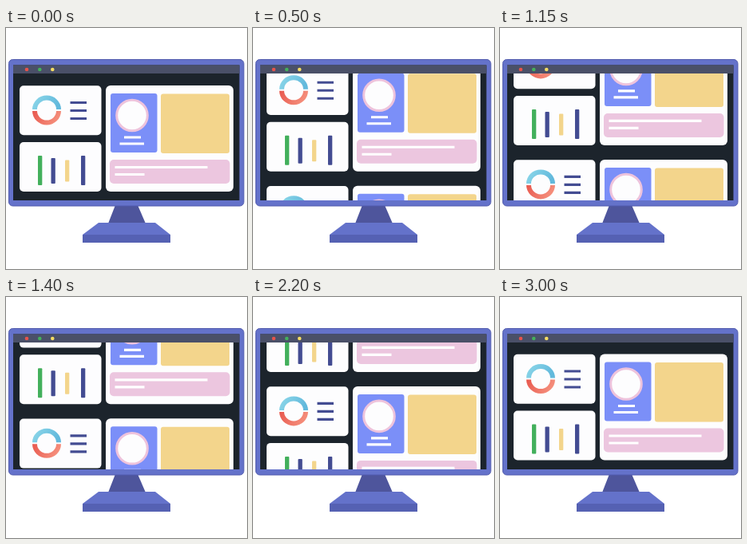
These frames come from a looping animation (302x302 px, 3050 ms). An HTML page:

```html
<!DOCTYPE html>
<html lang="en">
<head>
<meta charset="utf-8">
<title>Scrolling dashboard</title>
<style>
  html, body { margin: 0; width: 100%; height: 100%; overflow: hidden; background: #fff; }
  svg { display: block; width: 100vw; height: 100vh; }
  .navy { stroke: #434c92; }
  .white { stroke: #fff; }
  .line { fill: none; stroke-width: 3.2; }
</style>
</head>
<body>
<svg viewBox="0 0 302 302">
  <defs>
    <clipPath id="view"><rect x="10" y="57" width="282" height="159"/></clipPath>
    <linearGradient id="cool" x1="0" x2="1" y1="0" y2="0.3">
      <stop offset="0" stop-color="#8fd9ea"/><stop offset="1" stop-color="#62b9dc"/>
    </linearGradient>
    <linearGradient id="warm" x1="0" x2="1" y1="0" y2="0.3">
      <stop offset="0" stop-color="#e8584e"/><stop offset="1" stop-color="#f58f7c"/>
    </linearGradient>
    <g id="page">
      <g fill="#fdfdfe">
        <rect x="17" y="72.3" width="102.5" height="62" rx="5"/>
        <rect x="17" y="143" width="102.5" height="62" rx="5"/>
        <rect x="125" y="72" width="160" height="133" rx="6"/>
      </g>
      <!-- ring chart and list -->
      <path d="M33 102a18 17.5 0 0 1 36 0h-6a12 11.5 0 0 0-24 0z" fill="url(#cool)"/>
      <path d="M33 104a18 17.5 0 0 0 36 0h-6a12 11.5 0 0 1-24 0z" fill="url(#warm)"/>
      <path class="line navy" d="M80.5 93.5h20.5M80.5 103.5h20.5M80.5 113.5h20.5"/>
      <!-- bars -->
      <rect x="40" y="160" width="5.3" height="37" rx="1" fill="#43b05c"/>
      <rect x="56.5" y="163" width="5.3" height="32" rx="1" fill="#434c92"/>
      <rect x="74" y="165.5" width="5.3" height="27" rx="1" fill="#f3d58c"/>
      <rect x="94" y="160" width="5.3" height="37" rx="1" fill="#434c92"/>
      <!-- profile, panel and text strip -->
      <rect x="131" y="82" width="58.5" height="74" rx="3" fill="#7b8ff8"/>
      <circle cx="158" cy="109.5" r="19.3" fill="#fdfdfe" stroke="#eec3dc" stroke-width="3"/>
      <path class="line white" d="M148 137h21M142.5 145h30.5"/>
      <rect x="194" y="82.5" width="86" height="74.5" rx="3" fill="#f3d58c"/>
      <rect x="130" y="165" width="150.5" height="30" rx="5" fill="#ecc6df"/>
      <path class="line white" d="M136.5 174.5h116M136.5 183.5h37"/>
    </g>
  </defs>

  <path d="M137 222h28l10 23H128z" fill="#4e559c"/>
  <path d="M116 244h71l19 15H96z" fill="#6472ca"/>
  <path d="M96 259h110v10H96z" fill="#5561b3"/>

  <rect x="3.5" y="39.5" width="294.5" height="183.5" rx="5" fill="#6472ca" stroke="#515bad"/>
  <rect x="9" y="46.5" width="283.5" height="169.5" fill="#1c242c"/>
  <g clip-path="url(#view)">
    <g id="scroll">
      <use href="#page"/>
      <use href="#page" y="151"/>
    </g>
  </g>
  <rect x="9" y="46.5" width="283.5" height="10.5" fill="#4a5068"/>
  <circle cx="26" cy="52" r="2.3" fill="#e5534d"/>
  <circle cx="42.3" cy="52" r="2.3" fill="#43b05c"/>
  <circle cx="58.3" cy="52" r="2.3" fill="#f5dc62"/>
</svg>
<script>
  const LOOP = 3050, STEP = 50, SPEED = 0.0505;
  const scroll = document.getElementById('scroll');
  const start = performance.now();

  function draw(now) {
    const t = Math.max(0, now - start) % LOOP;
    const held = Math.floor(t / STEP) * STEP;
    scroll.setAttribute('transform', `translate(0 ${-held * SPEED})`);
    requestAnimationFrame(draw);
  }
  draw(start);
</script>
</body>
</html>
```
